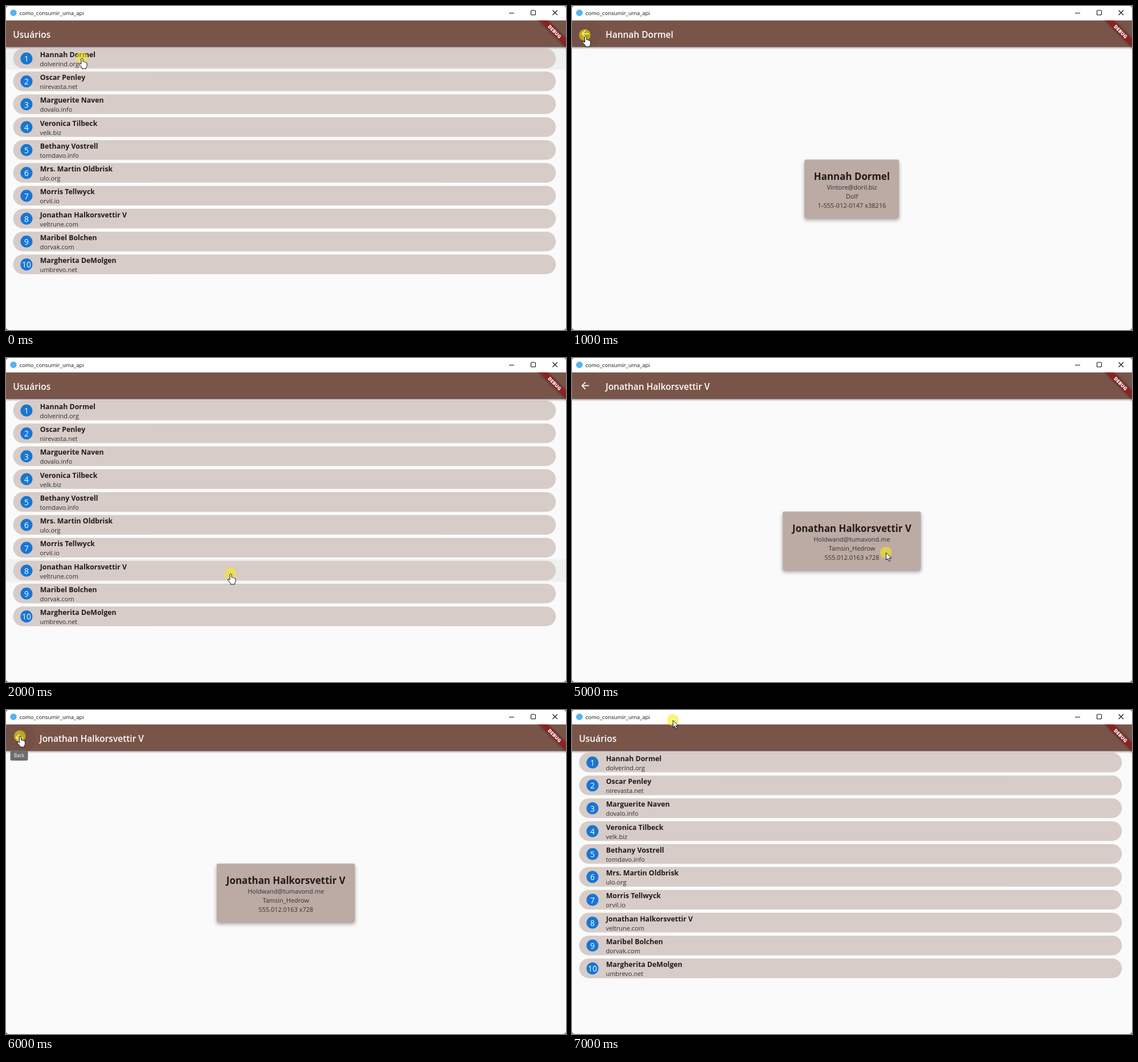
Recreate the animation shown at these times as an HTML page. Size 983 by 570 pixels, loop 8000 ms.

```html
<!DOCTYPE html>
<html lang="pt">
<head>
<meta charset="utf-8">
<title>como_consumir_uma_api</title>
<style>
  html, body { margin: 0; width: 100%; height: 100%; overflow: hidden; background: #5d7f93; }
  svg { display: block; width: 983px; height: 570px; border-radius: 5px; background: #fafafa; }
  text { font-family: "Open Sans", "Noto Sans", sans-serif; }
  .name { font-weight: 700; font-size: 12.33px; fill: #1f1b1a; }
  .info { font-size: 11px; fill: #35302e; }
  .num { font-size: 13.8px; fill: #fff; text-anchor: middle; }
  .bar { font-weight: 600; font-size: 15.5px; fill: #fff; }
  .big { font-weight: 700; font-size: 16.9px; fill: #1f1b1a; text-anchor: middle; }
  .mid { text-anchor: middle; }
  .line { fill: none; stroke: #111; stroke-width: 1.1; }
  .pointer { fill: #fff; stroke: #111; stroke-width: 1; stroke-linejoin: round; }
</style>
</head>
<body>
<svg viewBox="0 0 983 570" xmlns="http://www.w3.org/2000/svg">
  <defs>
    <clipPath id="app"><rect y="25.5" width="983" height="544.5"/></clipPath>
    <clipPath id="top"><rect y="25.5" width="983" height="46.5"/></clipPath>
    <filter id="barShade" x="-5%" y="-30%" width="110%" height="180%">
      <feDropShadow dx="0" dy="1.6" stdDeviation="1.7" flood-opacity=".42"/>
    </filter>
    <filter id="cardShade" x="-20%" y="-20%" width="140%" height="150%">
      <feDropShadow dx="0" dy="3.5" stdDeviation="3.2" flood-opacity=".36"/>
    </filter>
    <filter id="ribbonShade" filterUnits="userSpaceOnUse" x="910" y="0" width="110" height="110">
      <feDropShadow dx="0" dy="0" stdDeviation="2.4" flood-opacity=".5"/>
    </filter>
  </defs>

  <g id="list"></g>
  <g id="cards"></g>

  <rect y="25" width="983" height="47" fill="#795548" filter="url(#barShade)"/>
  <rect width="983" height="25.4" fill="#fff"/>
  <circle cx="13" cy="12" r="5.8" fill="#54b4f0"/>
  <text x="23.6" y="16" font-size="9.55" fill="#111">como_consumir_uma_api</text>
  <path class="line" d="M883 12.5h9M959.5 7.5l8.5 8.5m0-8.5l-8.5 8.5"/>
  <rect class="line" x="921.5" y="7.8" width="8" height="8" rx="1.3"/>

  <g id="back">
    <circle id="glow" cx="23.5" cy="48.7" r="28" fill="#000" opacity=".045" clip-path="url(#top)"/>
    <path fill="#fff" transform="translate(13 38.6) scale(.839)"
      d="M20 11H7.83l5.59-5.59L12 4l-8 8 8 8 1.41-1.41L7.83 13H20z"/>
  </g>
  <text id="title" class="bar" y="56"></text>

  <g clip-path="url(#app)">
    <path d="M923 5l75 75" stroke="#8a2120" stroke-width="10" filter="url(#ribbonShade)"/>
    <text transform="translate(963 45) rotate(45)" y="3.1" font-size="8.5" font-weight="800"
      fill="#fff" text-anchor="middle">DEBUG</text>
  </g>

  <g id="tip">
    <rect x="7.5" y="71" width="31" height="18" rx="3" fill="#6d6d6d"/>
    <text class="mid" x="23" y="83" font-size="8.2" fill="#fff">Back</text>
  </g>

  <circle id="spot" r="10.2" fill="#faeb0a" opacity=".56"/>
  <path id="arrow" class="pointer" d="M0 0V13l3-2.8 2 5 2.2-.9-2-4.8h4.3z"/>
  <path id="hand" class="pointer" d="M-1.6 1.4Q0-1 1.6 1.4V6.4Q3.2 5.4 4 7.1 5.6 6.2 6.4 8 8.6 7.6 8.6 9.8V13
    Q8.6 15 7.2 16.4V18.6H-.4V16.8L-5 11.6Q-5.6 9.4-3.4 9.6L-1.6 11z"/>
</svg>

<script>
const $ = id => document.getElementById(id);

const users = [
  ["Hannah Dormel", "dolverind.org"],
  ["Oscar Penley", "nirevasta.net"],
  ["Marguerite Naven", "dovalo.info"],
  ["Veronica Tilbeck", "velk.biz"],
  ["Bethany Vostrell", "tomdavo.info"],
  ["Mrs. Martin Oldbrisk", "ulo.org"],
  ["Morris Tellwyck", "orvil.io"],
  ["Jonathan Halkorsvettir V", "veltrune.com"],
  ["Maribel Bolchen", "dorvak.com"],
  ["Margherita DeMolgen", "umbrevo.net"]
];
const details = {
  0: { x: 408, w: 166, lines: ["Vintore@doril.biz", "Dolf", "1-555-012-0147 x38216"] },
  7: { x: 369.7, w: 242.8, lines: ["Holdwand@tumavond.me", "Tamsin_Hedrow", "555.012.0163 x728"] }
};

// One step per second: opened user, hovered row, pointer kind, spot x/y, pointer x/y.
const STEP = 1000;
const steps = [
  { row: 0, kind: "hand", at: [133, 91, 133.5, 91.5] },
  { user: 0, glow: true, kind: "hand", at: [22.5, 51, 24, 53] },
  { row: 7, kind: "hand", at: [394, 379, 394.5, 379.5] },
  { user: 7, kind: "arrow", at: [396, 299.4, 396.3, 300] },
  { user: 7, kind: "arrow", at: [569, 299.4, 569.3, 300] },
  { user: 7, kind: "arrow", at: [551, 342, 551.3, 342.6] },
  { user: 7, glow: true, tip: true, kind: "hand", at: [24.3, 46, 25, 46.5] },
  { kind: "arrow", at: [177, 17.8, 177.3, 18] }
];

const PITCH = 40.25;
const rowY = i => 72 + i * PITCH;

$("list").innerHTML =
  `<rect id="hover" width="983" height="${PITCH}" fill="#eff0f0"/>` +
  users.map(([name, site], i) => `<g transform="translate(0 ${rowY(i)})">
    <rect x="12.5" y="3" width="952.7" height="34.5" rx="17.25" fill="#d7ccc8"/>
    <circle cx="36" cy="20.4" r="10.6" fill="#1976d2"/>
    <text class="num" x="36" y="26">${i + 1}</text>
    <text class="name" x="59.7" y="17.8">${name}</text>
    <text class="info" x="59.4" y="33.8">${site}</text></g>`).join("");

$("cards").innerHTML = Object.entries(details).map(([i, { x, w, lines }]) => `<g id="card${i}">
  <rect x="${x}" y="270.3" width="${w}" height="102.6" rx="3" fill="#bcaaa4" filter="url(#cardShade)"/>
  <text class="big" x="491.3" y="305.8">${users[i][0]}</text>` +
  lines.map((s, k) => `<text class="info mid" x="491.3" y="${323 + 16 * k}">${s}</text>`).join("") +
  "</g>").join("");

const show = (id, on) => { $(id).style.display = on ? "" : "none"; };
const place = (id, x, y) => $(id).setAttribute("transform", `translate(${x} ${y})`);

function draw({ user, row, kind, at, glow, tip }) {
  const open = user !== undefined;
  show("list", !open);
  show("back", open);
  show("glow", glow);
  show("tip", tip);
  show("hover", row !== undefined);
  for (const i in details) show("card" + i, user === +i);
  $("hover").setAttribute("y", rowY(row ?? 0));
  $("title").textContent = open ? users[user][0] : "Usuários";
  $("title").setAttribute("x", open ? 59 : 12.3);
  for (const k of ["arrow", "hand"]) show(k, k === kind);
  place("spot", at[0], at[1]);
  place(kind, at[2], at[3]);
}

let last = -1;
function tick() {
  const i = Math.floor(performance.now() / STEP) % steps.length;
  if (i !== last) draw(steps[last = i]);
  requestAnimationFrame(tick);
}
tick();
</script>
</body>
</html>
```
